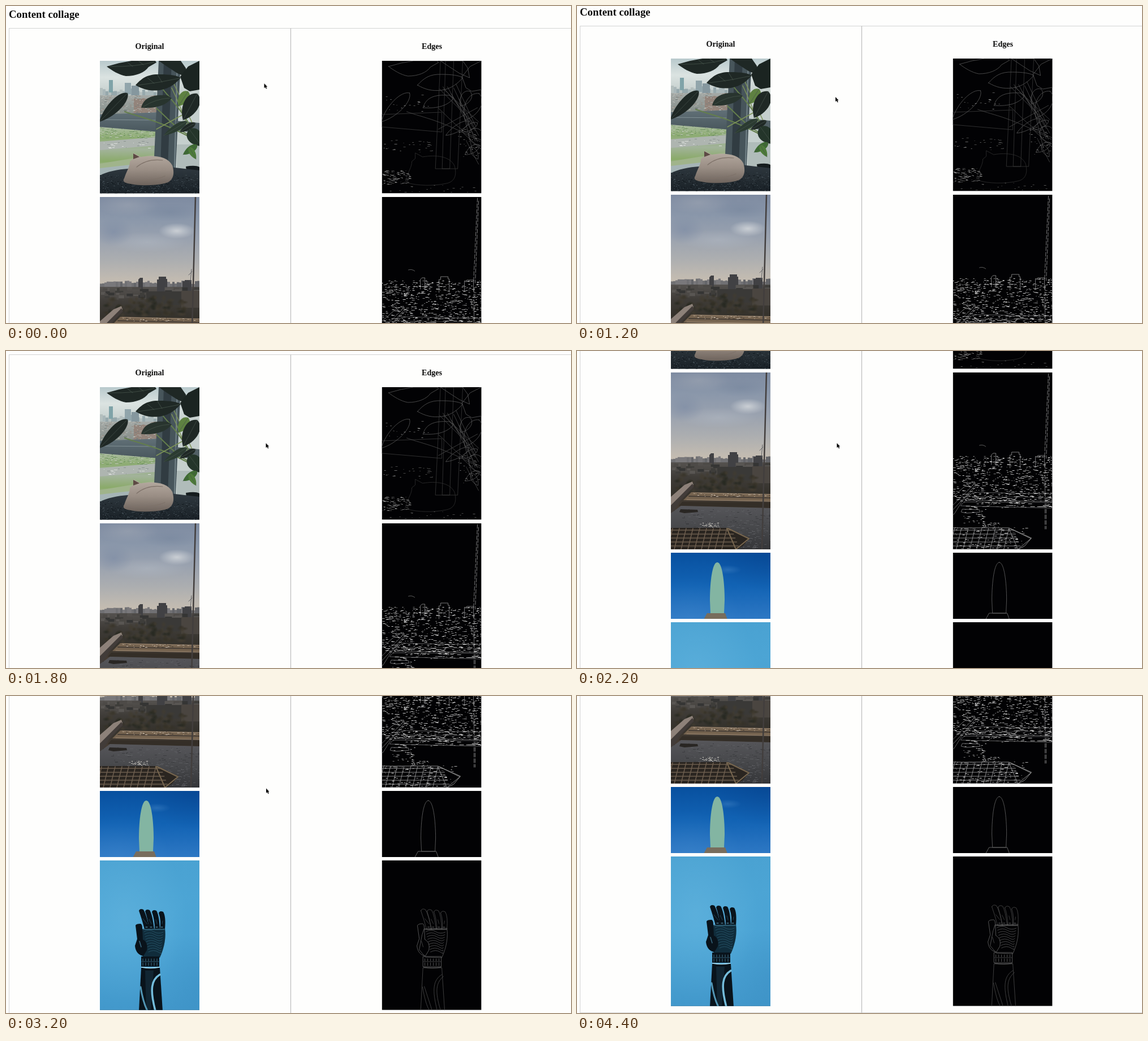
Animation of 999x561 px, one loop 4600 ms. Source, as an HTML page with a canvas:

```html
<!DOCTYPE html>
<html lang="en">
<head>
<meta charset="utf-8">
<title>Content collage</title>
<style>
html, body { margin: 0; width: 100%; height: 100%; overflow: hidden; background: #fefefd; }
#stage { position: relative; width: 999px; height: 561px; overflow: hidden; }
#page { position: absolute; left: 0; top: 0; width: 999px; height: 1060px; animation: scroll 4600ms step-end infinite; }
#page > * { position: absolute; margin: 0; }
h1, h2 { font: bold 18.8px/20px "Liberation Serif", serif; color: #0b0b0b; white-space: nowrap; }
h1 { left: 5px; top: 5px; }
h2 { width: 200px; top: 61px; font-size: 14.1px; text-align: center; }
.cell { top: 39px; height: 1016px; width: 497px; border: solid #d3d4d4; border-width: 1px 0 1px 1px; }
.cell + .cell { border-left-color: #b2b2b2; }
#cursor { position: absolute; left: 0; top: 0; overflow: visible; animation: point 4600ms step-end infinite; }
@keyframes scroll {
  0% { transform: translateY(0); }
  21.739% { transform: translateY(-1px); }
  26.086% { transform: translateY(-4px); }
  30.434% { transform: translateY(-8px); }
  34.782% { transform: translateY(-17px); }
  39.13% { transform: translateY(-33px); }
  43.478% { transform: translateY(-125px); }
  47.826% { transform: translateY(-300px); }
  56.521% { transform: translateY(-416px); }
  60.869% { transform: translateY(-476px); }
  69.565% { transform: translateY(-489px); }
  73.913%, 100% { transform: translateY(-496px); }
}
@keyframes point {
  0% { transform: translate(456.5px, 137px); }
  4.347% { transform: translate(456.5px, 143px); }
  8.695% { transform: translate(457px, 153px); }
  13.043% { transform: translate(457px, 160px); }
  17.391% { transform: translate(457px, 161px); }
  30.434% { transform: translate(458.5px, 162px); }
  39.13% { transform: translate(459.5px, 163px); }
  56.521% { transform: translate(460px, 163.5px); opacity: 1; }
  73.913%, 100% { transform: translate(460px, 163.5px); opacity: 0; }
}
</style>
</head>
<body>
<div id="stage">
  <div id="page">
    <div class="cell" style="left:5px"></div>
    <div class="cell" style="left:503px"></div>
    <canvas id="photos" width="999" height="1060"></canvas>
    <h1>Content collage</h1>
    <h2 style="left:154px">Original</h2>
    <h2 style="left:653px">Edges</h2>
  </div>
  <svg id="cursor" width="6" height="10"><path d="M0 0V8.2L2 6.5L3.3 9.6L4.8 8.9L3.5 6H5.6Z"/></svg>
</div>
<script>
const ctx = document.getElementById('photos').getContext('2d');
const LEFT = 166, WIDTH = 176, EDGE_SHIFT = 498.6;
let edge = false, seed = 7;

const random = () => (seed = (seed * 16807) % 2147483647) / 2147483647;
const pick = list => list[Math.floor(random() * list.length)];

function tone(y0, y1, ...colors) {
  const g = ctx.createLinearGradient(0, y0, 0, y1);
  colors.forEach((c, i) => g.addColorStop(i / (colors.length - 1), c));
  return g;
}

// Filled in the photo, outlined in the edge view.
function shape(d, color, trace = '#4c4c4c') {
  const path = new Path2D(d);
  if (!edge) {
    ctx.fillStyle = color;
    ctx.fill(path);
  } else if (trace) {
    ctx.lineWidth = 0.8;
    ctx.strokeStyle = trace;
    ctx.stroke(path);
  }
}

function line(d, color, width = 1, trace = '#4c4c4c') {
  if (edge && !trace) return;
  ctx.lineWidth = edge ? 0.8 : width;
  ctx.strokeStyle = edge ? trace : color;
  ctx.stroke(new Path2D(d));
}

function block(x, y, w, h, color, trace = null) {
  shape(`M${x} ${y}h${w}v${h}h${-w}Z`, color, trace);
}

function glow(x, y, rx, ry, color) {
  if (edge) return;
  ctx.save();
  ctx.translate(x, y);
  ctx.scale(rx, ry);
  const g = ctx.createRadialGradient(0, 0, 0, 0, 0, 1);
  g.addColorStop(0, color);
  g.addColorStop(1, color.slice(0, 7) + '00');
  ctx.fillStyle = g;
  ctx.fillRect(-1, -1, 2, 2);
  ctx.restore();
}

function specks(count, x, y, w, h, colors, length = 3) {
  for (let i = 0; i < count; i++) {
    ctx.fillStyle = pick(colors);
    ctx.fillRect(Math.floor(x + random() * w), Math.floor(y + random() * h), 1 + Math.floor(random() * length), 1);
  }
}

function leaf(x, y, tipX, tipY, spread, color = '#1f2825') {
  const dx = tipX - x, dy = tipY - y, len = Math.hypot(dx, dy);
  const nx = -dy / len * spread, ny = dx / len * spread;
  const side = s => `${x + dx * 0.1 + nx * s} ${y + dy * 0.1 + ny * s} ${x + dx * 0.65 + nx * s} ${y + dy * 0.65 + ny * s}`;
  shape(`M${x} ${y}C${side(1)} ${tipX} ${tipY}C${x + dx * 0.65 - nx} ${y + dy * 0.65 - ny} ${x + dx * 0.1 - nx} ${y + dy * 0.1 - ny} ${x} ${y}Z`, color, '#585858');
  line(`M${x} ${y}L${tipX} ${tipY}`, '#47544c', 0.7, null);
}

function photo(y, height, draw) {
  for (edge of [false, true]) {
    ctx.save();
    ctx.translate(edge ? EDGE_SHIFT : 0, 0);
    ctx.beginPath();
    ctx.rect(LEFT, y, WIDTH, height);
    ctx.clip();
    ctx.lineCap = ctx.lineJoin = 'round';
    ctx.fillStyle = '#020204';
    ctx.fillRect(LEFT, y, WIDTH, height);
    draw();
    ctx.restore();
  }
}

function windowScene() {
  block(166, 97, 176, 235, tone(97, 155, '#b8c9cc', '#dbe3e1', '#c5cfcd'));
  if (!edge) {
    for (let x = 166; x < 266; x += 5) block(x, 145 + random() * 8, 5, 20, pick(['#a9b7b9', '#96a8ac', '#b4bfbe']));
    block(182, 131, 7, 22, '#7fa3a8');
    block(210, 136, 11, 20, '#91a5ab');
    block(222, 141, 13, 18, '#85979e');
  }
  block(166, 158, 110, 40, tone(158, 196, '#a5aaa7', '#818b87'));
  block(226, 164, 40, 26, '#93847b');
  if (!edge) specks(220, 166, 158, 104, 34, ['#b8bcb7', '#777f7c', '#988a80', '#a9a8a2'], 4);
  block(166, 208, 100, 95, tone(212, 296, '#afbea7', '#8dac72', '#a2b39a', '#8aaa69', '#b8c2bf'));
  shape('M166 240L264 232V247L166 255Z', '#aeb5b0', null);
  if (!edge) {
    specks(130, 166, 214, 97, 20, ['#6f9360', '#bcc5b6', '#819f70'], 5);
    specks(25, 166, 239, 97, 13, ['#dadeda', '#8a9290'], 5);
  }
  shape('M166 279L264 263V302H166Z', '#a0b48b', null);
  shape('M166 287L264 276V305H166Z', '#a5b4b5', null);
  block(302, 245, 40, 50, '#b0bcba');
  shape('M166 192L272 188V223L166 214Z', tone(188, 222, '#617077', '#4a585e'), '#3c3c3c');
  line('M166 201L264 202', '#809094', 1.2, null);
  shape('M270 97H309L300 288H261Z', '#47555b', '#383838');
  shape('M279 97H293L286 288H273Z', '#313c42', '#383838');
  line('M303 97L298 285', '#748489', 2, null);
  shape('M300 203L342 207V225L299 220Z', '#515f65', null);
  line('M210 187C240 198 270 201 340 240M266 181C287 199 300 220 341 237M274 143C286 160 305 175 331 221', '#647e4c', 2);
  line('M297 138L332 213M293 145C310 180 316 200 331 239M266 218L335 180', '#7d9358', 1.5);
  if (edge) line('M268 147L331 210M275 147L337 205M282 143L335 240M302 164L337 229M311 193L326 255M288 155L311 190M310 225L340 252M316 240L337 280');
  const dark = '#1f2825', foliage = '#585858';
  shape('M178 107L200 101L222 97H264L266 100L252 108C245 118 230 124 212 124C200 122 187 114 178 107Z', dark, foliage);
  shape('M270 97H309L318 110L321 127L303 119L286 108Z', dark, foliage);
  shape('M229 140C240 128 250 120 272 121C290 121 303 123 309 127C300 137 290 146 272 149C255 151 243 148 229 140Z', dark, foliage);
  shape('M308 125L322 107L342 97V148L325 151L315 145Z', '#1b2421', foliage);
  shape('M239 180C243 163 258 156 285 158L293 163C283 176 265 182 239 180Z', '#28342e', foliage);
  line('M183 107Q230 108 262 99M234 140Q270 136 306 128M243 178Q265 164 289 163M250 127L262 137M268 122L276 135M215 100L224 107M235 98L243 104', '#46534b', 0.8, null);
  leaf(215, 154, 165, 205, 14);
  leaf(322, 151, 305, 177, 12, '#5e8141');
  leaf(338, 155, 313, 202, 18);
  leaf(320, 204, 279, 229, 8, '#2b3b31');
  leaf(335, 207, 307, 223, 7);
  leaf(324, 218, 346, 248, 17, '#24352a');
  leaf(338, 246, 313, 263, 8, '#3e6b33');
  leaf(324, 250, 336, 271, 7, '#4d7b39');
  shape('M318 284Q335 281 342 285V300H320Z', '#151c1e', null);
  shape('M166 300C190 286 240 286 290 285L342 291V332H166Z', tone(287, 331, '#2e373e', '#1a2127'), null);
  if (!edge) specks(420, 166, 298, 176, 34, ['#3d484f', '#12191e', '#2b353c'], 3);
  shape('M209 305C213 292 219 285 219 275L225 270L225 260L238 267C262 263 286 266 294 282C299 297 296 311 280 314C258 319 228 318 212 313C207 311 207 308 209 305Z', tone(263, 317, '#b5aaa0', '#998d84', '#6e645d'), '#303030');
  shape('M225 271L225 261L236 267Z', '#5d4a44', null);
  line('M231 285C244 274 261 271 277 273M223 308C240 310 265 308 281 301', '#7e7269', 1.2, null);
  if (edge) {
    specks(90, 167, 291, 48, 25, ['#666', '#888', '#444'], 5);
    specks(28, 166, 237, 92, 22, ['#444', '#666'], 5);
    specks(18, 166, 157, 85, 30, ['#555', '#777'], 4);
    specks(20, 180, 317, 160, 13, ['#444', '#555'], 4);
    specks(30, 300, 218, 42, 50, ['#777', '#555'], 3);
  }
}

function riverScene() {
  block(166, 338, 176, 165, tone(338, 488, '#7e8ba1', '#8a97aa', '#9aa2af', '#acaeb0', '#c4bcb1'));
  glow(302, 398, 32, 14, '#dcdfe1c0');
  glow(250, 418, 70, 18, '#b0b7c190');
  glow(215, 352, 55, 20, '#a1a8b480');
  glow(190, 400, 35, 25, '#7283a070');
  glow(290, 365, 50, 16, '#72829a70');
  if (!edge) {
    for (let x = 166; x < 342; x += 4) block(x, 486 + random() * 6, 4, 15, pick(['#707073', '#646569', '#79787b']));
  }
  block(166, 497, 176, 85, tone(497, 576, '#55524f', '#3f3c38', '#35322c', '#443b33'));
  shape('M234 501V484L237 481H242V501M267 507V484H270V479H283V483H285V507M312 505V487H316V485H328V505', '#414144', '#999');
  line('M326 488L328 466M323 476L329 470', '#636366', 1, null);
  if (!edge) {
    for (let i = 0; i < 45; i++) block(166 + random() * 170, 497 + random() * 17, 6 + random() * 10, 2 + random() * 6, pick(['#4d4a47', '#3e3d3a', '#595653', '#353534']));
    block(310, 504, 32, 30, '#4a4540');
    block(248, 505, 62, 24, '#3a3937');
    for (let i = 0; i < 90; i++) glow(172 + random() * 145, 516 + random() * 32, 4 + random() * 5, 3 + random() * 4, pick(['#262820e0', '#353126d0', '#423c30c0']));
  }
  shape('M166 558L190 537L204 531L206 537L184 562L166 581Z', '#8d8179', '#888');
  shape('M166 573L204 535L207 540L183 565L168 589H166Z', '#423c39', '#777');
  shape('M202 550L342 553V566L188 564Z', '#75634f', '#777');
  line('M198 557L342 560', '#483f37', 2);
  line('M205 551L342 554M194 563L342 566', '#9a8671', 1, null);
  if (!edge) specks(45, 205, 552, 135, 6, ['#a4937f', '#443c35', '#c2b6a8'], 4);
  shape('M186 567L342 568V578L180 574Z', '#342e27', '#777');
  shape('M166 587L184 574L342 578V651H166Z', tone(574, 651, '#56565a', '#47484b', '#343538'), null);
  if (!edge) specks(400, 184, 580, 158, 70, ['#505155', '#3c3d40', '#5b5c60'], 6);
  specks(35, 217, 604, 35, 8, edge ? ['#999'] : ['#d5d1c8', '#969594'], 3);
  shape('M183 580L213 581L214 585L190 587L181 585Z', '#292623', '#888');
  shape('M166 613H265L305 631L293 645L282 651H166Z', '#2a2520', '#aaa');
  const beams = [];
  for (let y = 617; y < 651; y += 7) beams.push(`M166 ${y}H${274 + (y - 617) * 0.4}`);
  for (let x = 164; x < 270; x += 12) beams.push(`M${x + 5} 614L${x - 4} 651`);
  line(beams.join(''), '#6c5d4e', 1.5, '#aaa');
  line('M265 614L281 651M267 614L304 632L282 650', '#77664f', 2, '#aaa');
  if (edge) {
    const whites = ['#aaa', '#ccc', '#777', '#999'];
    specks(110, 166, 486, 176, 12, whites, 4);
    specks(560, 166, 496, 176, 70, whites, 5);
    specks(110, 185, 552, 157, 26, whites, 8);
    specks(35, 185, 579, 40, 27, whites, 5);
    specks(110, 166, 612, 130, 38, whites, 5);
    line('M213 467Q219 465 224 469', '', 1, '#777');
    ctx.setLineDash([7, 3]);
    line('M335 340L328 490M337 345L331 490M329 500V615M331 560V615', '', 1, '#999');
  } else {
    line('M335 338L327 651', '#423e3d', 2.5);
  }
}

function monumentScene() {
  block(166, 657, 176, 118, tone(657, 775, '#08509f', '#1263b4', '#2e78c4'));
  glow(200, 775, 90, 75, '#4c91d148');
  glow(342, 657, 100, 70, '#06387f50');
  glow(267, 687, 24, 8, '#5d99d350');
  shape('M224 775L230 764H262L266 775Z', '#786d5d', '#777');
  shape('M248 674C257 674 261 710 261 741L260 764H236L235 741C235 710 239 674 248 674Z', '#83b5a2', '#666');
}

function handScene() {
  block(166, 780, 176, 266, tone(780, 1046, '#4aa2d2', '#4ea7d7', '#4298cb'));
  glow(210, 880, 110, 150, '#70bce260');
  glow(342, 1000, 80, 160, '#3486bd50');
  const dark = '#09131b', steel = '#102c3b', shine = '#74bddc';
  [[240, 869, 249], [251, 870, 257], [263, 871, 267], [275, 873, 276]].forEach(([x, y, base]) => {
    shape(`M${x - 5} ${y}Q${x - 3} ${y - 5} ${x + 3} ${y - 2}Q${x + 8} ${y + 6} ${base + 5} 902H${base - 4}Q${x} ${y + 14} ${x - 5} ${y}Z`, dark);
    line(`M${x + 2} ${y + 14}L${base} 892`, '#24495b', 0.9, '#444');
    line(`M${base - 2} 898H${base + 1}`, shine, 0.9, '#777');
  });
  shape('M241 901L281 900C283 915 281 932 272 952L243 951L232 938L237 912Z', steel, '#606060');
  const ridges = [];
  for (let i = 0; i < 9; i++) ridges.push(`M${244 + i} ${906 + i * 4.5}q9 -5 17 0t${17 - i * 1.6} 1`);
  line(ridges.join(''), '#285569', 0.9, '#555');
  line('M242 902H280', '#4f93b0', 0.9, '#777');
  shape('M229 895Q230 892 238 892Q241 893 241 900L242 920C248 923 251 929 249 939L243 949C235 948 229 942 228 931L232 919Z', dark, '#666');
  line('M236 923L239 933', '#376981', 1.5);
  shape('M239 950H271V968H239Z', dark, '#666');
  for (let x = 242; x < 270; x += 5) line(`M${x} 954V958M${x} 961V966`, '#365f73', 1.2, '#666');
  line('M240 959H270', '#315c72', 1);
  shape('M239 970H272L277 1046H235Z', dark);
  line('M240 969Q255 972 271 969', '#a6d8e9', 1.5, '#777');
  shape('M246 975H261L256 1046H248Z', '#112532', null);
  line('M272 982C257 991 254 1008 264 1046', shine, 3.5);
  line('M238 1004C241 1023 245 1037 251 1048', '#5296b5', 3);
  if (edge) line('M275 985C262 996 259 1010 270 1046M241 1003L255 1046');
}

photo(97, 234.6, windowScene);
photo(338, 313, riverScene);
photo(657, 117, monumentScene);
photo(780, 264.7, handScene);
</script>
</body>
</html>
```
